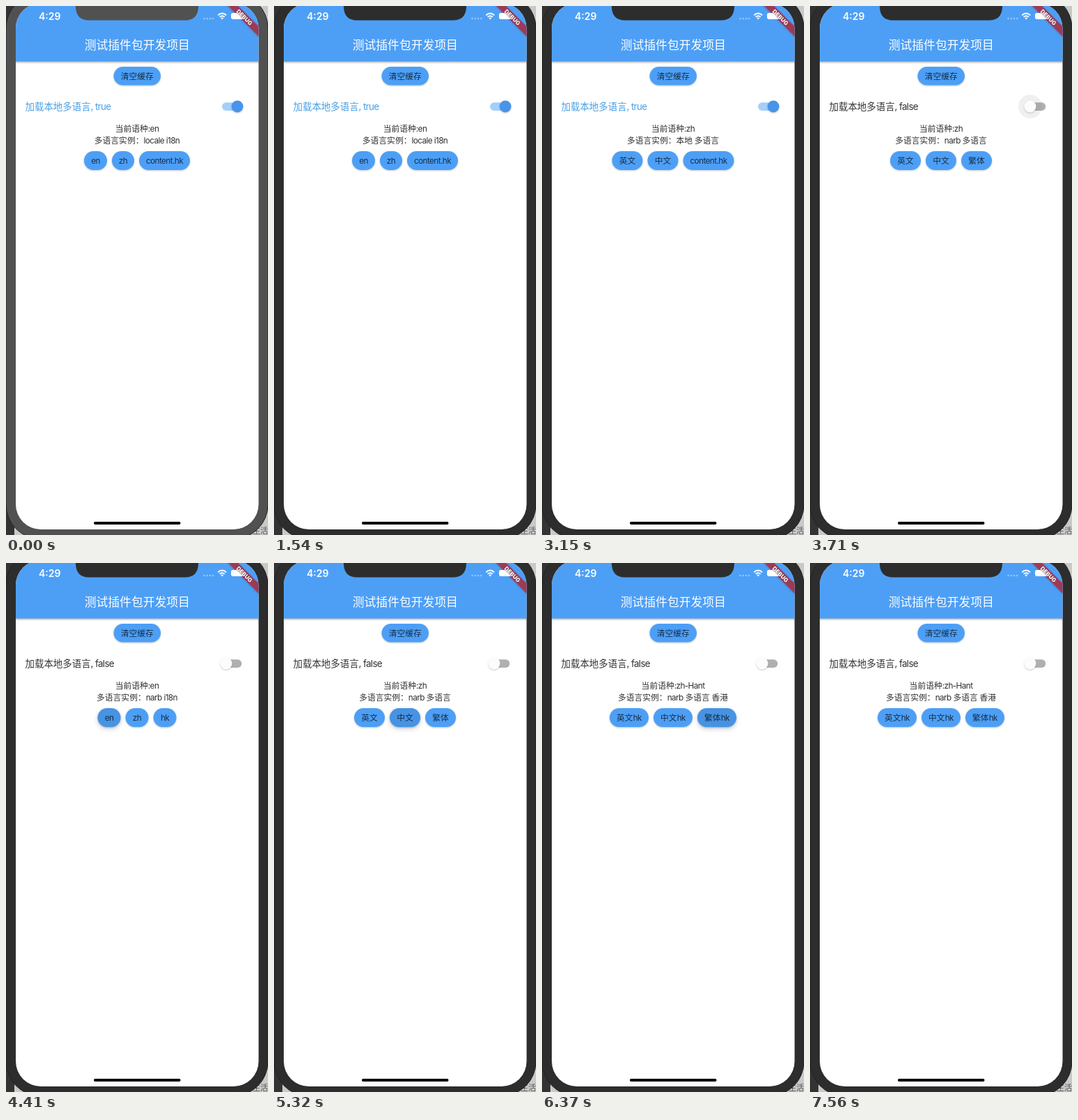
An HTML page that plays this animation: 376x758 px, repeating every 7.77 s.

```html
<!DOCTYPE html>
<html lang="zh-CN">
<head>
<meta charset="utf-8">
<title>多语言</title>
<style>
  html, body { margin: 0; width: 100%; height: 100%; overflow: hidden; background: #c9c9c9; }
  svg { display: block; width: 376px; height: 758px; font-family: Inter, "Noto Sans CJK SC", "Noto Sans CJK", sans-serif; }
  .latin { letter-spacing: -.05em; }
  .body { font-size: 11.77px; fill: #303030; text-anchor: middle; }
  .label { font-size: 11.77px; fill: #152f4b; text-anchor: middle; }
  .tile { font-size: 13.45px; }
  .chip { fill: #4d9ff6; }
</style>
</head>
<body>
<svg id="stage" viewBox="0 0 376 758">
  <defs>
    <clipPath id="screen"><rect x="14" y="-4" width="348.5" height="754" rx="36"/></clipPath>
    <clipPath id="pressed"><rect id="pressClip" y="208" height="27" rx="13.5"/></clipPath>
    <linearGradient id="barShadow" x2="0" y2="1">
      <stop stop-color="#000" stop-opacity=".3"/><stop offset="1" stop-color="#000" stop-opacity="0"/>
    </linearGradient>
    <filter id="lift" x="-20%" y="-30%" width="140%" height="180%">
      <feDropShadow dx="0" dy="1" stdDeviation="1" flood-color="#456" flood-opacity=".35"/>
    </filter>
    <filter id="blur" x="-30%" y="-60%" width="160%" height="220%"><feGaussianBlur stdDeviation="3"/></filter>
  </defs>

  <rect width="376" height="758" fill="#c9c9c9"/>
  <rect width="12" height="758" fill="#333"/>
  <text x="354" y="756" font-size="11" fill="#555">生活</text>
  <rect id="bezel" x="0" y="-18" width="376" height="782" rx="50" stroke="#222" stroke-width="1"/>

  <g clip-path="url(#screen)">
    <rect width="376" height="758" fill="#fff"/>
    <rect y="79" width="376" height="4" fill="url(#barShadow)"/>
    <rect y="-4" width="376" height="83.5" fill="#4d9ff6"/>
    <text x="188.3" y="62" font-size="16.8" font-weight="500" fill="#fff" text-anchor="middle">测试插件包开发项目</text>

    <g transform="translate(362.5 -4) rotate(45)">
      <rect x="-34" y="23.5" width="68" height="10.2" fill="#a82d45" fill-opacity=".88" filter="url(#lift)"/>
    </g>
    <g fill="#fff">
      <text x="47" y="20" font-size="14" font-weight="600">4:29</text>
      <g fill-opacity=".4">
        <circle cx="284.5" cy="18" r="1.3"/><circle cx="288.8" cy="18" r="1.3"/>
        <circle cx="293" cy="18" r="1.3"/><circle cx="297.2" cy="18" r="1.3"/>
      </g>
      <g fill="none" stroke="#fff" stroke-width="2">
        <path d="M304.3 13.2Q310.2 7.8 316.1 13.2M306.7 15.8Q310.2 12.7 313.7 15.8"/>
      </g>
      <path d="M308.3 17.3Q310.2 15.8 312.1 17.3L310.2 19.4Z"/>
      <rect x="323" y="10" width="18" height="9" rx="2.4"/>
    </g>
    <g transform="translate(362.5 -4) rotate(45)">
      <text y="31.6" font-size="8.2" font-weight="800" fill="#fff" text-anchor="middle" stroke="#6b3040" stroke-width=".8" paint-order="stroke">DEBUG</text>
    </g>

    <rect class="chip" x="154.5" y="87" width="67.5" height="26.5" rx="13.25" filter="url(#lift)"/>
    <text class="label" x="188.3" y="104.5">清空缓存</text>

    <rect id="track" x="310" y="138.2" width="28.3" height="11.8" rx="5.9"/>
    <circle id="halo" cy="144" r="17"/>
    <circle id="thumb" cy="144" r="8.4" filter="url(#lift)"/>

    <rect id="pressShadow" y="211" height="27" rx="13.5" fill="#234" filter="url(#blur)"/>
    <g id="views"></g>
    <g clip-path="url(#pressed)">
      <circle id="ripple" cy="221.5" fill="#000"/>
    </g>
    <rect x="126" y="739" width="124.5" height="4" rx="2"/>
  </g>
  <path id="notch" d="M94 -4Q100 -4 100 2Q101 20.5 119 20.5H257Q275 20.5 276 2Q276 -4 282 -4Z"/>
</svg>
<script>
const LOOP = 7770, STEP = 70, CENTER = 188;
const FOCUS_AT = 1540, SWITCH_TAP = 3150, SWITCH_AT = 3290;
const el = id => document.getElementById(id);
const clamp = v => Math.max(0, Math.min(1, v));
const ease = v => v * v * (3 - 2 * v);
const set = (node, attrs) => Object.entries(attrs).forEach(([k, v]) => node.setAttribute(k, v));
const mix = (a, b, p) => `rgb(${a.map((v, i) => Math.round(v + (b[i] - v) * p))})`;

// Each view lasts until the next one's start.
const views = [
  { at: 0, on: true, locale: 'en', sample: 'locale i18n', chips: [['en', 33], ['zh', 32], ['content.hk', 73]] },
  { at: 1890, on: true, locale: 'zh', sample: '本地 多语言', chips: [['英文', 44], ['中文', 44], ['content.hk', 73]] },
  { at: SWITCH_AT, on: false, locale: 'zh', sample: 'narb 多语言', chips: [['英文', 44], ['中文', 44], ['繁体', 44]] },
  { at: 4130, on: false, locale: 'en', sample: 'narb i18n', chips: [['en', 33], ['zh', 33], ['hk', 33]] },
  { at: 5250, on: false, locale: 'zh', sample: 'narb 多语言', chips: [['英文', 44], ['中文', 44], ['繁体', 44]] },
  { at: 6020, on: false, locale: 'zh-Hant', sample: 'narb 多语言 香港', chips: [['英文hk', 56], ['中文hk', 56], ['繁体hk', 56]] }
];
const taps = [
  { at: 1750, end: 2240, chip: 1 },
  { at: 3990, end: 4550, chip: 0 },
  { at: 5110, end: 5460, chip: 1 },
  { at: 5880, end: 6510, chip: 2 }
];

const latin = s => s.replace(/[ -~]+/g, run => `<tspan class="latin">${run}</tspan>`);
const text = (cls, x, y, s, extra = '') => `<text class="${cls}" x="${x}" y="${y}" ${extra}>${latin(s)}</text>`;

function layout(chips) {
  const gap = 7;
  let x = CENTER - (chips.reduce((sum, c) => sum + c[1], 0) + gap * (chips.length - 1)) / 2;
  return chips.map(([label, width]) => {
    const box = { label, x, width };
    x += width + gap;
    return box;
  });
}

function drawView(view) {
  view.boxes = layout(view.chips);
  const chips = view.boxes.map(({ label, x, width }) =>
    `<rect class="chip" x="${x}" y="208" width="${width}" height="27" rx="13.5" filter="url(#lift)"/>` +
    text('label', x + width / 2, 225.5, label)).join('');
  return '<g>' +
    text('tile', 27.5, 149, '加载本地多语言, ' + view.on, `fill="${view.on ? '#4a9fe3' : '#333'}"`) +
    text('body', CENTER, 180, '当前语种:' + view.locale) +
    text('body', CENTER, 197, '多语言实例：' + view.sample) + chips + '</g>';
}

el('views').innerHTML = views.map(drawView).join('');
const groups = [...el('views').children];

function drawSwitch(t) {
  const off = ease(clamp((t - SWITCH_AT) / 200));
  const x = 332 - 16 * off;
  const press = clamp((t - SWITCH_TAP) / 140) * clamp((3920 - t) / 350);
  set(el('track'), { fill: mix([164, 207, 250], [176, 176, 176], off) });
  set(el('thumb'), { cx: x, fill: mix([74, 148, 232], [252, 252, 252], off) });
  set(el('halo'), { cx: x, fill: off < .5 ? '#4d9ff6' : '#777', 'fill-opacity': press * .18 });
}

function drawPress(t, view) {
  const tap = taps.find(p => t >= p.at && t < p.end);
  const fade = tap ? clamp((t - tap.at) / 100) * clamp((tap.end - t) / 250) : 0;
  set(el('ripple'), { 'fill-opacity': fade * .14 });
  set(el('pressShadow'), { 'fill-opacity': fade * .35 });
  if (!tap) return;
  const { x, width } = view.boxes[tap.chip];
  set(el('pressClip'), { x, width });
  set(el('pressShadow'), { x, width });
  set(el('ripple'), { cx: x + width / 2, r: 6 + 34 * ease(clamp((t - tap.at) / 300)) });
}

function render(now) {
  const t = Math.floor(now % LOOP / STEP) * STEP;
  const current = views.findLastIndex(v => t >= v.at);
  groups.forEach((g, i) => { g.style.display = i === current ? '' : 'none'; });
  const frame = t < FOCUS_AT ? '#515151' : '#2d2d2d';
  set(el('bezel'), { fill: frame });
  set(el('notch'), { fill: frame });
  drawSwitch(t);
  drawPress(t, views[current]);
}

const start = performance.now();
function tick() {
  render(performance.now() - start);
  requestAnimationFrame(tick);
}
tick();
</script>
</body>
</html>
```
